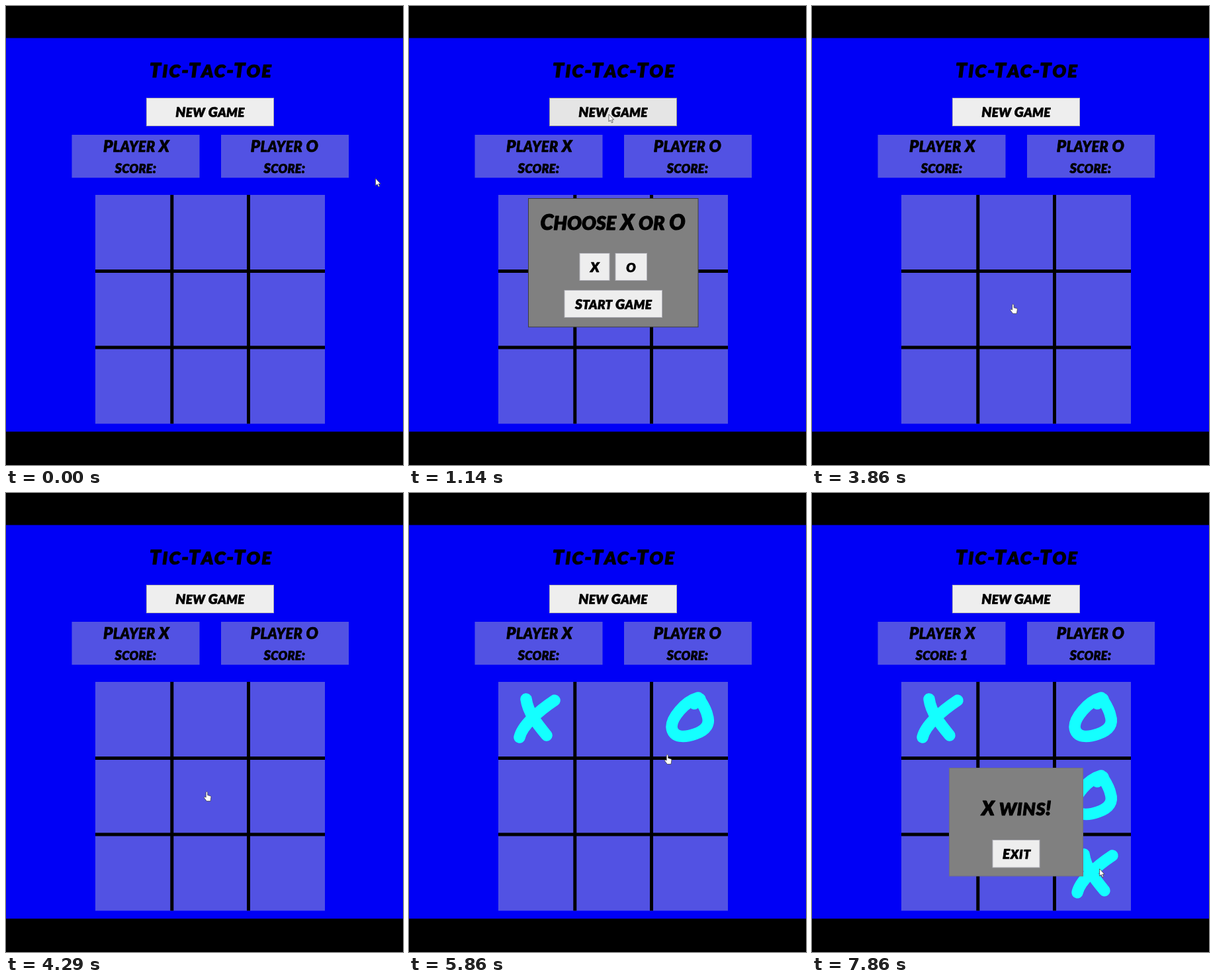
These frames come from a looping animation (600 by 695 pixels, 8 s). An HTML page:

```html
<!DOCTYPE html>
<html lang="en">
<head>
<meta charset="utf-8">
<title>Tic-Tac-Toe</title>
<style>
  html, body { margin: 0; width: 100%; height: 100%; overflow: hidden; background: #000; }
  svg { display: block; width: 600px; height: 695px; }
  text {
    font: italic 900 21px Lato, "Open Sans", sans-serif; letter-spacing: .3px; text-anchor: middle;
    fill: #000; stroke: #000; stroke-width: .7; stroke-linejoin: round;
  }
  .small { font-size: .9em; }
  .title { font-size: 30px; letter-spacing: 2.2px; stroke-width: 1.2; }
  .player { font-size: 24px; letter-spacing: .4px; }
  .score { font-size: 20px; }
  .choose { font-size: 32px; letter-spacing: 0; stroke-width: 1; }
  .wins { font-size: 30px; letter-spacing: .5px; stroke-width: 1; }
  .exit { letter-spacing: .8px; }
  .panel { fill: #5252e3; }
  .button { fill: #eee; stroke: #b0b0b8; stroke-width: 1; }
  .button.hover { fill: #e5e5e5; stroke: #999; }
  .dialog { fill: #808080; stroke: #3c3c3c; stroke-width: 1; }
  .dialog.plain { stroke: #707080; }
  .grid { stroke: #000; stroke-width: 5; }
  .mark { fill: none; stroke: #14ffff; stroke-width: 17.5; stroke-linecap: round; stroke-linejoin: round; }
  .cursor { fill: #fff; stroke: #444; stroke-width: .8; stroke-linejoin: round; }
</style>
</head>
<body>
<svg viewBox="0 0 600 695">
  <defs>
    <g id="x" class="mark">
      <path d="M177 312C180 333 194 350 208 367M220 314C196 330 171 352 167 370"/>
    </g>
    <g id="o" class="mark">
      <path d="M437 310C416 316 397 341 397 354C398 372 418 370 432 365C450 359 455 349 451 337C449 327 444 320 439 312M431 319L440 312"/>
    </g>
  </defs>

  <rect y="48.5" width="600" height="596" fill="#0000f6"/>
  <text class="title" x="310" y="108">Tic-Tac-Toe</text>
  <rect id="newGame" class="button" x="212.5" y="139.5" width="192" height="42"/>
  <text x="308.5" y="168">New Game</text>

  <rect class="panel" x="99.5" y="195" width="193" height="65"/>
  <rect class="panel" x="325" y="195" width="193" height="65"/>
  <text class="player" x="197" y="221">Player X</text>
  <text class="player" x="421" y="221">Player O</text>
  <text class="score" x="196" y="253" data-until="53">Score:</text>
  <text class="score" x="196" y="253" data-from="53">Score: 1</text>
  <text class="score" x="421" y="253">Score:</text>

  <rect class="panel" x="135" y="286" width="347" height="346.5"/>
  <path class="grid" d="M250.8 286V632.5M366.5 286V632.5M135 401.5H482M135 517H482"/>

  <use href="#x" data-from="32"/>
  <use href="#o" data-from="38"/>
  <use href="#x" x="117" y="118" data-from="44"/>
  <use href="#o" y="118" data-from="48"/>
  <use href="#x" x="234" y="235" data-from="53"/>

  <g data-from="7" data-until="24">
    <rect class="dialog" x="180.5" y="291.5" width="256.5" height="194.5"/>
    <text class="choose" x="308" y="339">Choose X or O</text>
    <rect id="pickX" class="button" x="258" y="374.5" width="45" height="41"/>
    <text x="281" y="403">X</text>
    <rect class="button" x="312" y="374.5" width="47.5" height="41"/>
    <text x="335.5" y="403">o</text>
    <rect id="start" class="button" x="235" y="430.5" width="147.5" height="41"/>
    <text x="309" y="459">Start Game</text>
  </g>

  <g data-from="53">
    <rect class="dialog plain" x="207.5" y="416.5" width="202" height="163.5"/>
    <text class="wins" x="309" y="488">X wins!</text>
    <rect class="button" x="273" y="525.5" width="71" height="41.5"/>
    <text class="exit" x="309.5" y="554">Exit</text>
  </g>

  <g id="cursor" class="cursor">
    <path id="arrow" d="M0 0V11L2.6 8.8L4.4 12.8L6.2 12L4.4 8.2H7.6Z"/>
    <path id="hand" d="M-.8 1.2Q.5-.7 1.7 1.2V5.5L6 6.7Q7 7 6.9 8.5L6 14.6H.3L-3.6 9.4Q-3.6 7.6-1.8 8.2L-.8 9Z"/>
  </g>
</svg>
<script>
const LOOP = 8000, STEP = 1000 / 7;
const byId = id => document.getElementById(id);

// Lowercase letters are set as slightly smaller capitals.
for (const label of document.querySelectorAll('text')) {
  label.innerHTML = label.textContent.replace(/[a-z]+/g,
    part => `<tspan class="small">${part.toUpperCase()}</tspan>`);
}

// Pointer stops: [step, x, y]
const stops = [
  [0, 558.5, 261], [1, 540, 254], [6, 302, 164], [10, 302, 164],
  [17, 288, 388], [20, 288, 388], [23, 304, 450], [30, 303, 452],
  [32, 192, 343], [34, 192, 343], [37, 424, 340], [39, 424, 340],
  [41, 390, 396], [43, 310, 455], [45, 310, 455], [47, 424, 455],
  [48, 424, 455], [50, 424, 567], [53, 424, 568], [55, 434.5, 569]
];
const timed = [...document.querySelectorAll('[data-from], [data-until]')];
const show = (el, on) => { el.style.display = on ? '' : 'none'; };
const within = (n, from, until) => n >= from && n < until;

function pointerAt(n) {
  const i = Math.max(1, stops.findIndex(stop => stop[0] >= n));
  const [n0, x0, y0] = stops[i - 1], [n1, x1, y1] = stops[i];
  const p = (n - n0) / (n1 - n0), ease = p * p * (3 - 2 * p);
  return [x0 + (x1 - x0) * ease, y0 + (y1 - y0) * ease];
}

function render(time) {
  const n = Math.min(55, Math.floor((time % LOOP + 5) / STEP));
  for (const el of timed) {
    show(el, within(n, +(el.dataset.from || 0), +(el.dataset.until || 56)));
  }
  byId('newGame').classList.toggle('hover', within(n, 6, 11));
  byId('pickX').classList.toggle('hover', within(n, 17, 21));
  byId('start').classList.toggle('hover', within(n, 22, 24));
  byId('cursor').setAttribute('transform', `translate(${pointerAt(n)})`);
  const overBoard = within(n, 24, 53);
  show(byId('hand'), overBoard);
  show(byId('arrow'), !overBoard);
}

const began = performance.now();
function tick() {
  render(performance.now() - began);
  requestAnimationFrame(tick);
}
tick();
</script>
</body>
</html>
```
